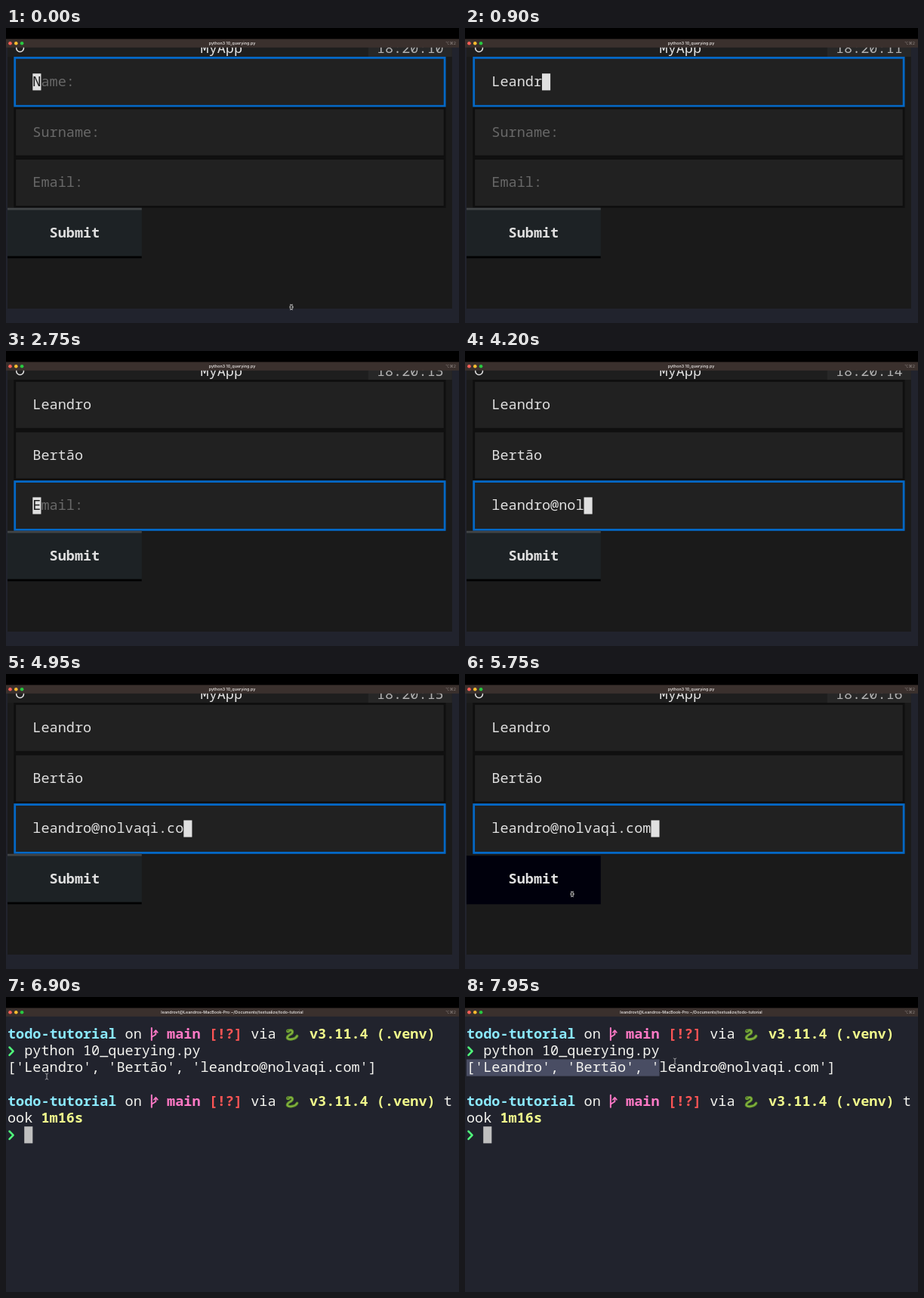
Write an HTML page with a canvas that moves like this. It is 600 px wide and 390 px high and loops after 8000 ms.

```html
<!DOCTYPE html>
<html lang="en">
<head>
<meta charset="utf-8">
<title>Form demo</title>
<style>
html, body { margin: 0; width: 100%; height: 100%; overflow: hidden; background: #21232d; }
canvas { display: block; width: 600px; height: 390px; }
</style>
</head>
<body>
<canvas id="stage"></canvas>
<script>
const LOOP = 8000, W = 600, H = 390;
const CW = 11.11, RH = 22.2, X0 = 2, Y0 = 38;
const MONO = '"Noto Sans Mono", "DejaVu Sans Mono", monospace';
const UI = 'Inter, "Liberation Sans", sans-serif';
const BG = '#21232d', LIGHT = '#e0e0e0';

const FIELDS = [
  { hint: 'Name:', text: 'Leandro', focus: 0, keys: [300, 400, 500, 600, 750, 850, 950] },
  { hint: 'Surname:', text: 'Bertão', focus: 1300, keys: [1600, 1800, 1950, 2100, 2300, 2450] },
  { hint: 'Email:', text: 'leandro@nolvaqi.com', focus: 2650,
    keys: [2850, 2950, 3050, 3150, 3300, 3400, 3500, 3900, 4050, 4100, 4200,
           4300, 4350, 4450, 4550, 4750, 4900, 4950, 5050] }
];
const EXIT = 6200, TICK = 550, HIDE = 300, SHOW = 5300;
const MOUSE = [ // time, x, y
  [0, 378, 369], [5300, 378, 369], [5700, 142, 291], [6250, 142, 291],
  [6850, 54, 105], [7000, 54, 105], [7250, 5, 94], [7950, 278, 85]
];
const DRAG = 7250, LAG = 50;

const canvas = document.getElementById('stage');
const ctx = canvas.getContext('2d');
const dpr = window.devicePixelRatio || 1;
canvas.width = W * dpr;
canvas.height = H * dpr;
ctx.scale(dpr, dpr);
ctx.lineCap = 'round';
ctx.lineJoin = 'round';

const colX = c => X0 + c * CW;
const rowY = r => Y0 + r * RH;

function box(x, y, w, h, color) {
  ctx.fillStyle = color;
  ctx.fillRect(x, y, w, h);
}

function cells(str, col, row, color, bold) {
  ctx.font = `${bold ? 700 : 400} 18.52px ${MONO}`;
  ctx.textAlign = 'left';
  ctx.fillStyle = color;
  [...str].forEach((ch, i) => {
    if (ch !== ' ') ctx.fillText(ch, colX(col + i), rowY(row) + 17);
  });
}

function stroke(points, color, width) {
  ctx.beginPath();
  points.forEach(([x, y], i) => i ? ctx.lineTo(x, y) : ctx.moveTo(x, y));
  ctx.strokeStyle = color;
  ctx.lineWidth = width;
  ctx.stroke();
}

function dot(x, y, r, color) {
  ctx.beginPath();
  ctx.arc(x, y, r, 0, Math.PI * 2);
  ctx.fillStyle = color;
  ctx.fill();
}

function mouseAt(t) {
  let i = 1;
  while (i < MOUSE.length - 1 && MOUSE[i][0] <= t) i++;
  const [t0, x0, y0] = MOUSE[i - 1], [t1, x1, y1] = MOUSE[i];
  let k = Math.min(1, (t - t0) / (t1 - t0));
  if (t < DRAG) k = k * k * (3 - 2 * k);
  return [x0 + (x1 - x0) * k, y0 + (y1 - y0) * k];
}

function titleBar(title) {
  box(0, 0, W, 15, '#000');
  box(0, 14.5, W, 11.3, '#3a302d');
  ['#ff5f57', '#febc2e', '#28c840'].forEach((c, i) => dot(5.5 + i * 7.8, 20.2, 2.3, c));
  ctx.font = `600 5.3px ${UI}`;
  ctx.textAlign = 'center';
  ctx.fillStyle = '#dcd8d6';
  ctx.fillText(title, 299.5, 22.1);
  ctx.font = `400 5.3px ${UI}`;
  ctx.textAlign = 'right';
  ctx.fillStyle = '#8d8481';
  ctx.fillText('⌥⌘2', 596, 22.1);
}

function field(f, i, t) {
  const next = FIELDS[i + 1];
  const focused = t >= f.focus && (!next || t < next.focus);
  const top = rowY(i * 3), row = i * 3 + 1;
  box(colX(0.75), top, 51.5 * CW, RH * 3, focused ? '#0468c6' : '#0f0f0f');
  box(colX(1), top + 2.8, 51 * CW, RH * 3 - 5.6, '#212121');

  const n = f.keys.filter(k => k <= t).length;
  cells(n ? f.text.slice(0, n) : f.hint, 3, row, n ? LIGHT : '#686868');
  if (focused) {
    box(colX(3 + n), rowY(row), CW, RH, LIGHT);
    if (!n) cells(f.hint[0], 3, row, '#1c1c1c');
  }
}

function button(hover) {
  const y = rowY(9), w = 16 * CW;
  if (hover) {
    box(X0, y + 2.4, w, RH * 3 - 2.4, '#00000c');
  } else {
    box(X0, y, w, RH * 3, '#1d2225');
    box(X0, y, w, 2.8, '#414446');
    box(X0, y + RH * 3 - 2.8, w, 2.8, '#020202');
  }
  cells('Submit', 5, 10, LIGHT, true);
}

function appPointer(x, y) {
  ctx.beginPath();
  ctx.ellipse(x, y, 2.1, 2.8, 0, 0, Math.PI * 2);
  ctx.fillStyle = '#111';
  ctx.fill();
  ctx.strokeStyle = '#c8c8c8';
  ctx.lineWidth = 0.9;
  ctx.stroke();
  stroke([[x - 1.6, y], [x + 1.6, y]], '#c8c8c8', 0.7);
  stroke([[x - 1.6, y - 3.6], [x, y - 2.8], [x + 1.6, y - 3.6]], '#c8c8c8', 0.7);
  stroke([[x - 1.6, y + 3.6], [x, y + 2.8], [x + 1.6, y + 3.6]], '#c8c8c8', 0.7);
}

function drawApp(t) {
  box(X0, 25, 53 * CW, 346, '#1a1a1a');
  box(X0, 25, 53 * CW, 13, '#1e1e1e');
  box(colX(43), 25, 10 * CW, 13, '#272727');
  ctx.beginPath();
  ctx.arc(18.6, 26.6, 4.9, 0, Math.PI * 2);
  ctx.strokeStyle = LIGHT;
  ctx.lineWidth = 1.5;
  ctx.stroke();
  cells('MyApp', 23, -1, LIGHT);
  const sec = 10 + Math.max(0, Math.floor((t - TICK) / 1000) + 1);
  cells('18:20:' + sec, 44, -1, '#b2b2b2');

  FIELDS.forEach((f, i) => field(f, i, t));
  const [x, y] = mouseAt(t);
  const shown = t < HIDE || t >= SHOW;
  button(shown && x < colX(16) && y < rowY(12));
  if (shown) appPointer(x, y);
  titleBar('python3 10_querying.py');
}

function branch(x, y) {
  const pink = '#ff79c6';
  stroke([[x + 2, y + 3], [x + 2, y + 19]], pink, 2);
  stroke([[x + 2, y + 15], [x + 7.5, y + 11.5], [x + 7.5, y + 7]], pink, 1.8);
  stroke([[x + 5, y + 9], [x + 7.5, y + 6], [x + 10, y + 9]], pink, 1.6);
}

function snake(x, y) {
  const curve = (color, width) => {
    ctx.beginPath();
    ctx.moveTo(x + 5, y + 7);
    ctx.bezierCurveTo(x + 11, y + 4, x + 13, y + 9, x + 8, y + 11.5);
    ctx.bezierCurveTo(x + 0, y + 16, x + 5, y + 19, x + 11, y + 17.5);
    ctx.quadraticCurveTo(x + 15, y + 17, x + 17, y + 13.5);
    ctx.strokeStyle = color;
    ctx.lineWidth = width;
    ctx.stroke();
  };
  curve('#5d8f2c', 3.6);
  curve('#8fb844', 1.3);
  dot(x + 5, y + 7, 2.5, '#6f9f35');
  dot(x + 4.6, y + 6.4, 0.6, '#1c2612');
}

function prompt(row) {
  cells('todo-tutorial', 0, row, '#8be9fd', true);
  cells('on', 14, row, '#f4f4f0');
  branch(colX(17), rowY(row));
  cells('main', 19, row, '#ff79c6', true);
  cells('[!?]', 24, row, '#ff5555', true);
  cells('via', 29, row, '#f4f4f0');
  snake(colX(33), rowY(row));
  cells('v3.11.4 (.venv)', 36, row, '#f1fa8c', true);
}

function chevron(row) {
  const y = rowY(row) + 11.5;
  stroke([[4.5, y - 5.2], [9.6, y], [4.5, y + 5.2]], '#50fa7b', 2.5);
}

function iBeam(x, y) {
  const c = '#b4b4b8';
  stroke([[x, y - 3], [x, y + 3]], c, 0.9);
  stroke([[x - 1.8, y - 4], [x, y - 3], [x + 1.8, y - 4]], c, 0.8);
  stroke([[x - 1.8, y + 4], [x, y + 3], [x + 1.8, y + 4]], c, 0.8);
}

function drawTerminal(t) {
  if (t > DRAG + LAG) {
    const cols = Math.floor((mouseAt(t - LAG)[0] - X0) / CW);
    box(X0, rowY(2), cols * CW, RH, '#494d63');
  }
  prompt(0);
  chevron(1);
  cells('python 10_querying.py', 2, 1, '#f4f4f0');
  cells(`[${FIELDS.map(f => `'${f.text}'`).join(', ')}]`, 0, 2, '#f4f4f0');
  prompt(4);
  cells('t', 52, 4, '#f4f4f0');
  cells('ook', 0, 5, '#f4f4f0');
  cells('1m16s', 4, 5, '#f1fa8c', true);
  chevron(6);
  box(colX(2), rowY(6), CW, RH, '#bfbfbf');
  iBeam(...mouseAt(t));
  titleBar('leandrovt@Leandros-MacBook-Pro:~/Documents/textualize/todo-tutorial');
}

const start = performance.now();
function render() {
  const t = Math.max(0, performance.now() - start) % LOOP;
  box(0, 0, W, H, BG);
  if (t < EXIT) drawApp(t);
  else drawTerminal(t);
  requestAnimationFrame(render);
}
render();
</script>
</body>
</html>
```
